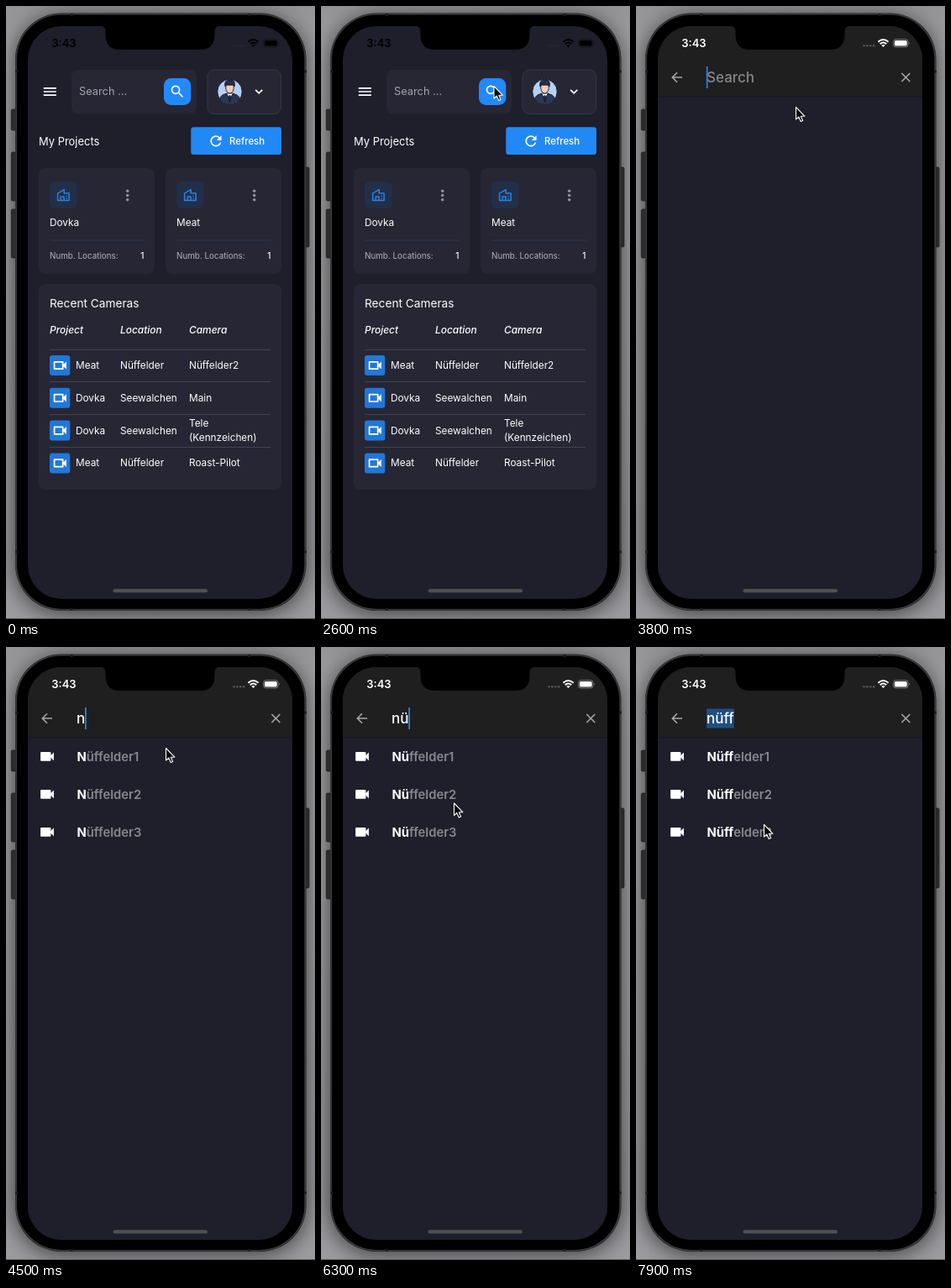
An HTML page that plays this animation: 368x730 px, repeating every 8000 ms.

```html
<!DOCTYPE html>
<html lang="en">
<head>
<meta charset="utf-8">
<title>Camera search</title>
<style>
html, body { margin: 0; width: 100%; height: 100%; overflow: hidden; background: #98989b; }
svg { display: block; width: 368px; height: 730px; font-family: Inter, "Open Sans", sans-serif; }
text { white-space: pre; }
</style>
</head>
<body>
<svg id="stage" viewBox="0 0 368 730">
  <defs>
    <linearGradient id="wall" x1="0" y1="0" x2="0" y2="1">
      <stop offset="0" stop-color="#949497"/>
      <stop offset=".1" stop-color="#a6a6a9"/>
      <stop offset=".5" stop-color="#a2a2a5"/>
      <stop offset="1" stop-color="#9c9ca0"/>
    </linearGradient>
    <filter id="blur" x="-20%" y="-20%" width="140%" height="140%"><feGaussianBlur stdDeviation="13"/></filter>
    <clipPath id="screen"><rect x="26" y="24" width="315" height="682" rx="40"/></clipPath>
    <clipPath id="face"><circle cx="266.5" cy="102" r="14.4"/></clipPath>
    <g id="plant" fill="none" stroke="#2b82e4" stroke-width="1.5" stroke-linejoin="round">
      <path d="M1 14V5.5L8.6 1V5.5H14.5V14Z"/>
      <path d="M4.6 14V9.5H8.4V14M11.5 8.2V9.4M11.5 11V12.2"/>
    </g>
    <g id="dots" fill="#92929b">
      <circle r="1.75" cy="-5.2"/><circle r="1.75"/><circle r="1.75" cy="5.2"/>
    </g>
  </defs>

  <rect width="368" height="730" fill="url(#wall)"/>
  <rect x="9" y="12" width="350" height="712" rx="58" fill="#000" opacity=".6" filter="url(#blur)"/>
  <rect y="729" width="368" height="1" fill="#5c5c60"/>

  <g fill="#2c2c2e" stroke="#171718" stroke-width=".7">
    <rect x="6.3" y="123" width="6" height="25" rx="1.5"/>
    <rect x="6.3" y="174" width="6" height="58" rx="1.5"/>
    <rect x="6.3" y="242" width="6" height="58" rx="1.5"/>
    <rect x="356" y="192" width="5" height="95" rx="1.5"/>
  </g>
  <rect x="11" y="8.5" width="346.5" height="711.5" rx="55" fill="#1a1a1b"/>
  <rect x="12.2" y="9.7" width="344" height="709" rx="54" fill="#000" stroke="#3c3c3e" stroke-width="1.6"/>
  <path d="M11 78H14M355 78H358M11 650H14M355 650H358M78 9V12M290 9V12M78 717V720M290 717V720" stroke="#1c1c1d" stroke-width="3"/>

  <g clip-path="url(#screen)">
    <rect x="26" y="24" width="315" height="682" fill="#1f1e2b"/>
    <g id="home"></g>
    <g id="search">
      <rect x="26" y="24" width="315" height="682" fill="#1f1e2b"/>
      <rect x="26" y="107" width="315" height="1.5" fill="#191922"/>
      <rect x="26" y="24" width="315" height="83" fill="#1f1f1f"/>
      <path d="M55 85H43.6M49 79.3L43.3 85L49 90.7M316.3 80L326.3 90M326.3 80L316.3 90" fill="none" stroke="#a6a6a6" stroke-width="1.6"/>
      <rect id="mark" x="84" y="73.5" height="23" fill="#1f4f80"/>
      <text id="hint" x="84" y="91" font-size="17" font-weight="500" fill="#878787">Search</text>
      <text id="query" x="84" y="91" font-size="17" font-weight="500" fill="#fff"></text>
      <rect id="caret" y="72" width="1.7" height="26" fill="#2b86ec"/>
      <g id="hits"></g>
    </g>
    <rect x="127.5" y="694.3" width="112.5" height="4.2" rx="2.1" fill="#505054"/>
    <g id="status">
      <text x="54.3" y="49" font-size="13" font-weight="600">3:43</text>
      <g id="signal" fill="#5c5c5e">
        <circle cx="271.5" cy="47.3" r="1.2"/><circle cx="275.4" cy="47.3" r="1.2"/>
        <circle cx="279.3" cy="47.3" r="1.2"/><circle cx="283.2" cy="47.3" r="1.2"/>
      </g>
      <g fill="none" stroke="currentColor" stroke-width="1.9">
        <path d="M288.4 42.7Q294.5 37.5 300.6 42.7M290.7 45.2Q294.5 42 298.3 45.2"/>
      </g>
      <path d="M292.4 46.8Q294.5 45.2 296.6 46.8L294.5 49Z"/>
      <rect x="306.6" y="39.7" width="17.4" height="9.2" rx="2.8" fill="none" stroke="currentColor" stroke-opacity=".45" stroke-width=".9"/>
      <rect x="307.9" y="41" width="14.8" height="6.6" rx="1.7"/>
      <path d="M325 42.8Q326.6 44.3 325 45.8Z" opacity=".5"/>
    </g>
  </g>
  <path d="M112 23.5Q118.5 24 118.5 30V34Q118.5 52 136 52H231Q248.5 52 248.5 34V30Q248.5 24 255 23.5Z" fill="#000"/>

  <path id="mouse" d="M0 0V14.6L3.3 11.5L5.7 17L8.1 16L5.8 10.7H10.3Z" fill="#000" stroke="#fff" stroke-width="1.1" stroke-linejoin="round"/>
</svg>
<script>
const LOOP = 8000, STEP = 100;
const NAME = 'Nüffelder', PROJECT = 'Dovka';
const CARD = '#272635';
const $ = id => document.getElementById(id);

const label = (x, y, size, str, fill = '#fff', extra = '') =>
  `<text x="${x}" y="${y}" font-size="${size}" fill="${fill}" ${extra}>${str}</text>`;
const box = (x, y, w, h, r, fill, extra = '') =>
  `<rect x="${x}" y="${y}" width="${w}" height="${h}" rx="${r}" fill="${fill}" ${extra}/>`;
const line = (x1, x2, y, color) => `<path d="M${x1} ${y}H${x2}" stroke="${color}"/>`;

// Icon shapes on a 24 unit grid, placed by their centre
const VIDEO = 'M17 10.5V7Q17 6 16 6H4Q3 6 3 7V17Q3 18 4 18H16Q17 18 17 17V13.5L21 17.5V6.5Z';
const ICONS = {
  menu: 'M3 18H21V16H3ZM3 13H21V11H3ZM3 6V8H21V6Z',
  search: 'M15.5 14H14.7L14.4 13.7A6.5 6.5 0 1 0 13.7 14.4L14 14.7V15.5L19 20.5L20.5 19ZM9.5 14A4.5 4.5 0 1 1 9.5 5A4.5 4.5 0 1 1 9.5 14Z',
  refresh: 'M17.65 6.35A8 8 0 1 0 19.73 14H17.65A6 6 0 1 1 16.22 7.78L13 11H20V4Z',
  video: VIDEO,
  videoOutline: VIDEO + 'M5 8V16H15V8Z'
};
const icon = (name, x, y, scale) =>
  `<path d="${ICONS[name]}" fill="#fff" fill-rule="evenodd" transform="translate(${x} ${y}) scale(${scale}) translate(-12 -12)"/>`;

function header() {
  return icon('menu', 52.3, 102, .84)
    + box(78, 76, 149, 52.5, 8, CARD)
    + label(87, 106, 12.8, 'Search ...', '#a3a3ab')
    + box(188, 86, 32.3, 32, 8.5, '#2389fc')
    + icon('search', 204.1, 101.9, .82)
    + box(240, 76, 87.5, 52.5, 8, CARD, 'stroke="#36364a"')
    + avatar()
    + `<path d="M297.2 99.8L301.2 103.8L305.2 99.8" fill="none" stroke="#fff" stroke-width="1.8"/>`
    + label(39, 165.7, 12.95, 'My Projects')
    + box(220.3, 144.3, 107.7, 32.7, 3, '#2189f5')
    + icon('refresh', 250, 160.8, .82)
    + label(266, 164.8, 11.4, 'Refresh', '#fff', 'font-weight="500"');
}

function avatar() {
  return `<circle cx="266.5" cy="102" r="14.8" fill="#b5d0f5" stroke="#11131d"/>
    <g clip-path="url(#face)" stroke="#12141f" stroke-width=".9">
      <path d="M255 118V110Q255.5 106 262 104.5H271Q277.5 106 278 110V118Z" fill="#2a3856"/>
      <path d="M262.5 104L266.5 110.5L270.5 104Z" fill="#fff"/>
      <path d="M266.5 106L265.2 109L266.5 115L267.8 109Z" fill="#263453"/>
      <path d="M261.8 94V98.5Q262.6 103.4 266.5 104Q270.4 103.4 271.2 98.5V94Z" fill="#f3cdb4"/>
      <path d="M261 96Q259.6 89 264.5 88.4Q269 86.8 271.5 89.6Q273 92 272 96L270.5 93.8H262.5Z" fill="#26304a"/>
    </g>`;
}

const projectCard = (x, name) =>
  box(x, 193, 138, 126, 8, CARD)
  + box(x + 13, 209, 32.5, 32, 6, '#222f48')
  + `<use href="#plant" x="${x + 21.6}" y="217.6"/><use href="#dots" x="${x + 105.7}" y="225.5"/>`
  + label(x + 13, 262.2, 11.8, name)
  + line(x + 13, x + 126, 279, '#2d3850')
  + label(x + 13, 301.4, 9.85, 'Numb. Locations:', '#b4b4bc')
  + label(x + 125.5, 301.4, 10, '1', '#fff', 'text-anchor="end" font-weight="500"');

function cameraRow([project, place, ...camera], i) {
  const y = 428 + i * 38.8;
  const two = camera.length > 1;
  return line(52, 315, Math.round(y - 19.5) + .5, '#42414f')
    + box(52, y - 12, 24.3, 24, 3, '#2277d8')
    + icon('videoOutline', 64.3, y, .84)
    + label(83, y + 4, 11.8, project) + label(136, y + 4, 11.8, place)
    + camera.map((s, k) => label(218, y + 4 + (two ? k * 17 - 8.5 : 0), 11.8, s)).join('');
}

$('home').innerHTML = header() + projectCard(39, PROJECT) + projectCard(190, 'Meat')
  + box(39, 331, 289, 245, 8, CARD)
  + label(52, 358.8, 13.7, 'Recent Cameras')
  + [[52, 'Project'], [136, 'Location'], [218, 'Camera']].map(([x, s]) =>
      label(x, 390, 11.9, s, '#fff', 'font-style="italic" font-weight="500"')).join('')
  + [['Meat', NAME, NAME + '2'], [PROJECT, 'Seewalchen', 'Main'],
     [PROJECT, 'Seewalchen', 'Tele', '(Kennzeichen)'], ['Meat', NAME, 'Roast-Pilot']].map(cameraRow).join('');

$('hits').innerHTML = [1, 2, 3].map(n => {
  const y = 90.6 + n * 45;
  return icon('video', 49, y - 5.2, .88)
    + label(84.5, y, 14.8, `<tspan class="hit" fill="#fff" font-weight="700"></tspan><tspan class="rest"></tspan>${n}`,
      '#88888d', 'font-weight="600"');
}).join('');

// [time, x, y] of the pointer tip
const PATH = [
  [100, 317, 508], [200, 262, 300], [300, 205, 97], [400, 166, 240], [500, 166, 240],
  [600, 68, 413], [700, 287, 300], [800, 205, 162], [900, 205, 162],
  [1000, 237, 155], [1100, 168, 166], [1600, 168, 166], [1700, 169, 166],
  [2100, 272, 142], [2500, 206, 98], [2600, 206, 95.5], [3300, 206, 95.5], [3800, 190.5, 120.5],
  [5400, 190.5, 120.5], [5500, 185.5, 128.5], [6300, 158.5, 186], [7600, 158.5, 186], [7900, 152.5, 211.5]
];
const FADE = [[3100, 0], [3200, .6], [3300, .6], [3400, .85], [3600, 1]];
const TYPED = [[4200, 1], [4900, 2], [6900, 3], [7200, 4]];
const CARET_RESETS = [3400, 4200, 4400, 4900, 6900, 7200];
const BLINK = [[0, 1], [550, 1], [700, 0], [850, 0], [1000, 1]];

// Linear value between [time, ...values] keys
function at(keys, t, k = 1) {
  const i = keys.findIndex(key => key[0] >= t);
  if (i < 0) return keys[keys.length - 1][k];
  if (!i) return keys[0][k];
  const a = keys[i - 1], b = keys[i];
  return a[k] + (b[k] - a[k]) * (t - a[0]) / (b[0] - a[0]);
}

function draw(t) {
  const open = at(FADE, t);
  $('search').setAttribute('opacity', open);
  $('status').setAttribute('fill', open ? '#fff' : '#000');
  $('status').setAttribute('color', open ? '#fff' : '#000');
  $('signal').setAttribute('opacity', open ? 1 : .15);

  const count = TYPED.reduce((n, [time, len]) => t >= time ? len : n, 0);
  const word = NAME.slice(0, count);
  $('query').textContent = word.toLowerCase();
  $('hint').setAttribute('visibility', count ? 'hidden' : 'visible');
  const width = count ? $('query').getComputedTextLength() : 0;

  $('mark').setAttribute('width', t >= 7400 ? width : 0);
  const reset = CARET_RESETS.reduce((r, time) => t >= time ? time : r, 0);
  $('caret').setAttribute('x', 83.8 + width);
  $('caret').setAttribute('opacity', t < 3400 ? 0 : at(BLINK, (t - reset) % 1000));

  $('hits').setAttribute('visibility', t >= 4400 ? 'visible' : 'hidden');
  document.querySelectorAll('.hit').forEach(e => e.textContent = word);
  document.querySelectorAll('.rest').forEach(e => e.textContent = NAME.slice(count));

  $('mouse').setAttribute('visibility', t < 100 ? 'hidden' : 'visible');
  $('mouse').setAttribute('transform', `translate(${at(PATH, t, 1)} ${at(PATH, t, 2)})`);
}

const start = performance.now();
function tick() {
  const t = (performance.now() - start) % LOOP;
  draw(Math.floor(t / STEP) * STEP);
  requestAnimationFrame(tick);
}
tick();
</script>
</body>
</html>
```
